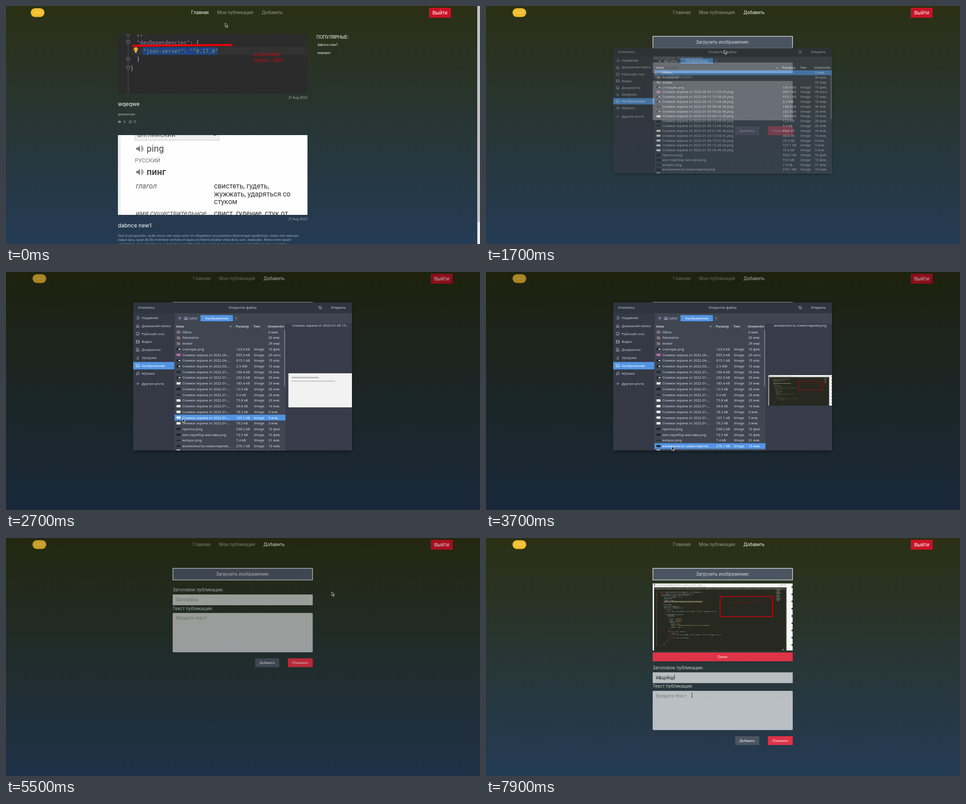
Animation, 1055 px wide and 531 px high, one loop 8 s. Source, as an HTML page:

```html
<!DOCTYPE html>
<html lang="ru">
<head>
<meta charset="utf-8">
<title>Новая публикация</title>
<style>
  html, body { margin: 0; width: 100%; height: 100%; overflow: hidden; background: #273638; }
  #stage { display: block; width: 1055px; height: 531px; }
  text { white-space: pre; }
  .ui { font-family: Inter, sans-serif; }
  .gtk { font-family: "Noto Sans", "Open Sans", sans-serif; }
  .mono { font-family: "DejaVu Sans Mono", monospace; }
  .dict { font-family: Roboto, sans-serif; }
  .mark { font-family: "Liberation Sans", sans-serif; }
</style>
</head>
<body>
<svg id="stage" viewBox="0 0 1055 531"></svg>
<script>
const LOOP = 8000, TICK = 100;
const BLUE = '#5294e2', RED = '#df3347', SLATE = '#4b5562';
const stage = document.getElementById('stage');

const text = (x, y, s, size, fill, more = '') =>
  `<text x="${x}" y="${y}" font-size="${size}" fill="${fill}" ${more}>${s}</text>`;
const rect = (x, y, w, h, fill, more = '') =>
  `<rect x="${x}" y="${y}" width="${w}" height="${h}" fill="${fill}" ${more}/>`;
const line = (d, stroke, width = 0.8, more = '') =>
  `<path d="${d}" fill="none" stroke="${stroke}" stroke-width="${width}" ${more}/>`;
const shape = (d, fill, more = '') => `<path d="${d}" fill="${fill}" ${more}/>`;
const group = (id, body, cls = '') => `<g id="${id}" class="${cls}">${body}</g>`;
const MID = 'text-anchor="middle"', END = 'text-anchor="end"', BOLD = 'font-weight="600"';

function nav() {
  const link = (id, x, s) => text(x, 18.4, s, 9.89, '#9a9c8f', `id="${id}"`);
  return rect(59, 5, 30.6, 19.5, '#f3bd2b', 'rx="9.7"') +
    text(74.3, 17.4, 'LOGO', 7, '#f9dd8c', MID) +
    link('home', 416, 'Главная') + link('mine', 474, 'Мои публикация') + link('add', 573, 'Добавить') +
    rect(945.5, 4, 48.5, 22, '#cb1226') + text(969.7, 18.6, 'Выйти', 10.99, '#fff', MID);
}

function editorShot() {
  const fold = y => `<path d="M268.5 ${y - 4}h7v5.5l-3.5 3l-3.5 -3zM270.5 ${y}h3" fill="#2b2b2b" stroke="#8a8a8a" stroke-width=".9"/>`;
  const code = (x, y, s, fill) => text(x, y, s, 11.55, fill);
  return '<svg x="249" y="63" width="422" height="132" viewBox="249 63 422 132">' +
    rect(249, 63, 422, 132, '#2b2b2b') + rect(280, 91, 391, 18, '#323232') +
    rect(304, 92, 168, 17, '#214283') + line('M272 63V195', '#606060') +
    fold(63) + fold(81) + fold(119) + fold(138) +
    '<g class="mono">' + code(291, 66, '},', '#a9b7c6') +
    code(291, 85.5, '<tspan fill="#9a7bab">"devDependencies"</tspan>: {', '#a9b7c6') +
    code(305, 104.5, '"json-server": "^0.17.0"', '#7d9b6c') +
    code(291, 123, '}', '#a9b7c6') + code(277, 142.5, '}', '#a9b7c6') + '</g>' +
    '<circle cx="289" cy="96.5" r="4.6" fill="#f0a732"/>' + rect(287, 101, 4, 3, '#c9c9c9') +
    line('M281 89Q390 87.5 504 87', '#e20008', 4.4) +
    `<g class="mark">${text(550, 112, 'установил', 12.8, '#c30c14')}${text(550, 125, 'через --dev', 12.8, '#c30c14')}</g></svg>`;
}

function dictionaryShot() {
  const speaker = y => shape(`M290 ${y - 2.5}h3.5l4.5 -4.5v14l-4.5 -4.5h-3.5z`, '#777') +
    line(`M300.5 ${y - 3.5}q3 3.5 0 7M301.5 ${y - 7}q7 7 0 14`, '#777', 1.5);
  const word = (x, y, s, more) => text(x, y, s, 15.6, '#333', more);
  const italic = 'font-style="italic" fill-opacity=".8"';
  return '<svg x="249" y="288" width="422" height="178" viewBox="249 288 422 178" class="dict">' +
    rect(249, 288, 422, 178, '#fefefe') + rect(249, 288, 2, 178, '#dfe3e4') + line('M253.5 288V466', '#c5cacb', 1) +
    rect(287, 280, 187, 19.5, '#efefef', 'stroke="#c4c4c4"') +
    text(292, 291.5, 'английский', 15.6, '#555') + shape('M461 287h7l-3.5 3.5z', '#666') +
    speaker(318.5) + text(313, 325, 'ping', 20, '#444') +
    text(287, 349, 'РУССКИЙ', 12.2, '#777') +
    speaker(370.5) + text(313, 377, 'пинг', 20, '#333', 'font-weight="500"') +
    word(289, 406.5, 'глагол', italic) + word(463, 407, 'свистеть, гудеть,') +
    word(463, 424.5, 'жужжать, ударяться со') + word(463, 442, 'стуком') +
    word(289, 467.5, 'имя существительное', italic) + word(463, 467.5, 'свист, гудение, стук от') + '</svg>';
}

function feedPage() {
  const grey = '#b4b8b4';
  return editorShot() + text(671, 207.3, '21 Aug 2022', 7.15, grey, END) +
    text(249, 222.6, 'wqeqwe', 12.1, '#fff') + text(249, 243.6, 'qweqweqw', 7.15, grey) +
    shape('M249.3 258.4q3.3 -4.8 6.6 0q-3.3 4.8 -6.6 0z', grey) +
    '<circle cx="252.6" cy="258.4" r="1.1" fill="#2a3735"/>' + text(261, 261, '3', 7.15, grey) +
    line('M274 261v-2.6a2.8 2.7 0 1 1 2.8 2.6zM275.4 258.4h2.8', grey, 0.7) + text(284.8, 261, '0', 7.15, grey) +
    dictionaryShot() + text(671, 478.1, '21 Aug 2022', 7.15, grey, END) +
    text(249, 493.6, 'dabnce new1', 12.1, '#fff') +
    ['Sed ut perspiciatis, unde omnis iste natus error sit voluptatem accusantium doloremque laudantium, totam rem aperiam',
     'eaque ipsa, quae ab illo inventore veritatis et quasi architecto beatae vitae dicta sunt, explicabo. Nemo enim ipsam',
     'voluptatem, quia voluptas sit, aspernatur aut odit aut fugit, sed quia consequuntur magni dolores eos, qui ratione']
      .map((s, i) => text(249, 514.5 + i * 9.6, s, 7.15, '#a8b0b5')).join('') +
    text(691, 73.3, 'ПОПУЛЯРНЫЕ:', 9.7, '#fff') +
    text(693.3, 89.2, 'dabnce new1', 7.2, '#fff') + text(693.3, 106.5, 'wqeqwe', 7.2, '#fff') +
    rect(1049, 0, 6, 531, '#e9ebeb') + rect(1049.6, 0, 5.4, 482, '#bdc0c0');
}

// Code listing: leading digit is the indent level.
const LISTING = `0async commentsByPostId(req: Request, res: Response) {
1const post_id: any = req.params.post_id;
1CommentModel.find({ post: post_id })
2.sort({ createdAt: -1 })
2.populate({
3path: "user",
3select: "fullname avatarUrl profile_bi nickname",
2})
2.limit(100)
2.populate("comments")
2.exec((err, comments) => {
3if (err) {
4return res.status(500).json({ status: "error", message: err });
3}
4CommentModel.populate(
5comments,
5{
6path: "children",
6model: "Comment",
6populate: {
7path: "user",
7select: "fullname avatarUrl profile_bi nickname",
7model: "user",
6},
5},
5function (err, items) {
6if (err) {
7return res.status(500).json({ status: "error", message: err });
6}
7return res.json(items);
5}
4);
3}
2});
0}`.split('\n');

const tint = s => s.replace(/("[^"]*")|\b(async|function|const|return|if)\b|(\w+)(?=\()/g, (m, str, key) =>
  `<tspan fill="${str ? '#e6db74' : key ? '#f0568c' : '#7fd3e0'}">${m}</tspan>`);

// Drawn in a 312 x 150 box.
function codeShot() {
  let s = rect(0, 0, 312, 150, '#f8f8f6') + rect(3, 9, 295, 141, '#27281f') + rect(3, 9, 295, 5, '#45463f');
  s += rect(3, 2.2, 2.6, 2.6, '#444') + text(7, 4.8, 'src/controllers/CommentController.ts (server, client) - editor', 2.8, '#444') +
    text(4, 8.3, 'File  Edit  Selection  Find  View  Goto  Tools  Project  Preferences  Help', 2.6, '#555') +
    line('M281 3.5h3M287 2.5h2v2h-2zM293.5 2l2.5 2.5m0 -2.5l-2.5 2.5', '#555', 0.5);
  for (let i = 0; i < 13; i++) s += text(7 + i * 22, 12.8, 'module' + i + '.ts ×', 2.5, '#a5a69e');
  s += rect(25, 39.2, 85, 3.5, '#57564a');
  LISTING.forEach((row, i) => {
    const y = 21 + i * 3.53;
    s += text(10, y, 20 + i, 2.6, '#85867c', END) +
      text(16 + row[0] * 3.58, y, tint(row.slice(1)), 2.97, '#d5d5c8');
  });
  for (let i = 0; i < 19; i++) s += rect(274 + i * 3 % 5, 12.5 + i * 1.5, 3 + i * 7 % 9, 0.7, '#85867a');
  for (let i = 0; i < 9; i++) s += `<ellipse cx="312" cy="${8 + i * 16.2}" rx="2.8" ry="2" fill="#222"/>`;
  s += rect(296, 14, 2, 136, '#4a4b44') + rect(289, 147, 3, 2, '#aaa') +
    rect(150, 29.2, 117, 45, 'none', 'stroke="#c3060c" stroke-width="1.8"') +
    text(166, 44, 'здесь вложенность коментариев в посте', 3.4, '#a80b10');
  return `<g class="mono">${s}</g>`;
}

function formPage() {
  const label = '#c8cbc8', hint = '#7c827f', glass = 'fill-opacity=".68"';
  const fields = text(371, 119.2, 'Заголовок публикации:', 9.89, label) +
    rect(371, 126, 311.7, 24, '#fff', glass) +
    text(378, 141.4, 'Заголовок', 9.89, hint, 'id="hint"') + text(378, 141.4, '', 9.89, '#15191a', 'id="typed"') +
    rect(378, 131.2, 0.8, 11.6, '#111', 'id="caret"') +
    text(371, 160.8, 'Текст публикации:', 9.89, label) +
    rect(371, 167.3, 311.7, 87.6, '#fff', glass + ' rx="2.5"') +
    text(378, 182.4, 'Введите текст', 9.89, hint) +
    rect(554.5, 268.5, 53.5, 19.6, SLATE) + text(581.2, 281, 'Добавить', 7.25, '#fff', MID) +
    rect(627.5, 268.5, 55.2, 19.6, RED) + text(655, 281, 'Отменить', 7.25, '#fff', MID);
  const upload = `<svg x="371" y="101.3" width="311.7" height="149.7" viewBox="0 0 312 150" preserveAspectRatio="none">${codeShot()}</svg>` +
    rect(371, 255.3, 311.7, 19.7, RED) + text(526.6, 267.7, 'Delete', 7.15, '#fff', MID);
  return rect(371.5, 67.6, 310.8, 26, SLATE, 'stroke="#e6e9ea" stroke-width="1.3"') +
    text(526.7, 83.6, 'Загрузить изображение:', 9.89, '#d9dcde', MID) +
    group('upload', upload) + group('fields', fields);
}

// name | size | date | thumbnail colour
const shot = s => 'Снимок экрана от 2022-' + s;
const FILES = ['Обои||6 мая.|', 'flameshot||30 янв.|', 'avatar||29 мар.|',
  'счетщик.png|133.4 kB|10 фев.|half', shot('06-29 11-53-43.png|995.5 kB|29 июн.|#c467b5'),
  shot('04-15 10-58-33.png|915.1 kB|15 апр.|half'), shot('03-10 11-24-28.png|2.9 MB|10 мар.|half'),
  shot('01-30 00-48-36.png|148.4 kB|30 янв.|#282c30'), shot('01-30 00-02-46.png|232.9 kB|30 янв.|half'),
  shot('01-29 00-12-26.png|185.4 kB|29 янв.|#e4e4e4'), shot('01-26 12-04-47.png|12.9 kB|26 янв.|#1e2228'),
  shot('01-26 12-04-13.png|5.4 kB|26 янв.|thin'), shot('01-20 01-00-30.png|75.8 kB|20 янв.|#f2f2f2'),
  shot('01-14 13-53-01.png|38.8 kB|14 янв.|#f2f2f2'), shot('01-06 15-01-42.png|78.3 kB|6 янв.|#f2f2f2'),
  shot('01-05 15-20-20.png|107.1 kB|5 янв.|#f2f2f2'), shot('01-03 00-49-35.png|76.3 kB|3 янв.|#f2f2f2'),
  'пропсы.png|338.2 kB|10 фев.|#23272b', 'мэп перебор массива.png|73.5 kB|10 фев.|#1f2328',
  'вопрос.png|7.4 kB|31 янв.|thin', 'вложенность коментариев.png|276.1 kB|19 мая.|#25282b'
].map(s => s.split('|'));
const short = (s, n) => s.length > n ? s.slice(0, n).replace(/\.p?$/, '') + '…' : s;

function thumb(y, kind) {
  if (!kind) return shape(`M380 ${y - 3.2}h3.5l1 1h3.7v5.4h-8.2z`, '#857672') + rect(380, y - 3.4, 4, 1, '#b4534f');
  if (kind === 'thin') return rect(379.5, y - 1.2, 9, 2.4, '#20242a');
  if (kind === 'half') return rect(379.5, y - 2.5, 9, 5, '#1f2327') + rect(384, y - 1.2, 4, 2.6, '#dedede');
  return rect(379.5, y - 2.6, 9, 5.2, kind);
}

function fileList(id, sel, narrow) {
  const dx = narrow ? -148 : 0, right = narrow ? 622 : 770, ink = '#d3dae3', head = '#c3c9d3';
  const title = (x, s) => text(x, 124, s, 7.6, head, BOLD);
  let s = rect(375, 115, right - 375, 283, '#404552') +
    title(378.5, 'Имя') + shape(`M${645.5 + dx} 122.3h5l-2.5 -2.6z`, head) +
    title(659.5 + dx, 'Размер') + title(699 + dx, 'Тип') + title(731 + dx, 'Изменён') +
    line(`M${655.7 + dx} 117v10M${695.5 + dx} 117v10M${727.5 + dx} 117v10`, '#575c69', 0.7);
  FILES.forEach(([name, size, date, kind], i) => {
    const y = 134 + i * 12.72, col = i === sel ? '#fff' : ink;
    const cell = (x, v) => text(x, y + 2.7, v, 7.63, col);
    if (i === sel) s += rect(375, y - 6.4, right - 375, 12.8, BLUE);
    s += thumb(y, kind) + cell(392.8, narrow ? short(name, 25) : name) +
      cell(660.3 + dx, size) + cell(700 + dx, size && 'Image') + cell(732 + dx, date);
  });
  s += rect(379.5, 396.2, 8, 2, '#eee') + line(`M392 397.4H${right}`, '#9aa0ab', 0.7, 'stroke-dasharray="3 2"') +
    rect(right - 2.8, 129, 2, 127, '#777d8a', 'rx="1"');
  if (narrow) {
    s += rect(622, 115, 148, 283, '#383c4a') +
      text(699.5, 122.3, short(FILES[sel][0], 30), 7.63, '#d3dae3', MID);
    s += sel === 20
      ? `<svg x="628.5" y="230" width="141.5" height="68" viewBox="0 0 312 150" preserveAspectRatio="none">${codeShot()}</svg>`
      : rect(628.5, 226, 141.5, 76, '#f2f2f2') + rect(636, 234, 60, 3, '#b9b9b9') + rect(636, 242, 96, 3, '#d0d0d0');
  }
  return `<svg id="${id}" x="375" y="115" width="395" height="283" viewBox="375 115 395 283">${s}</svg>`;
}

function dialog() {
  const ink = '#c9cfd8', frame = '#2f343f';
  const places = [
    ['Недавние', 'M-3 0a3.2 3.2 0 1 0 1 -2.5M0 -2v2.2l1.6 1'],
    ['Домашняя папка', 'M-4 .3l4 -3.8l4 3.8M-2.7 -.6v4h2v-2.4h1.4v2.4h2v-4'],
    ['Рабочий стол', 'M-3.5 -3h7v4.6h-7zM-2 3.4h4'],
    ['Видео', 'M-3.5 -3h7v6h-7zM-1.8 -3v6M1.8 -3v6'],
    ['Документы', 'M-3 -3.5h4l2 2v5h-6zM-1.5 0h3M-1.5 1.8h3'],
    ['Загрузки', 'M0 -3.5v4.5M-2 -1l2 2l2 -2M-3.2 3h6.4'],
    ['Изображения', 'M-3.5 -3h7v6h-7zM-3.3 2.5l2.5 -3l1.8 2l1 -1l1.3 2'],
    ['Музыка', 'M-1.5 2.2v-5l4.3 -.7v5M-1.5 2.2a1 1 0 1 1 -.3 -.6M2.8 1.5a1 1 0 1 1 -.3 -.6'],
    ['Другие места', 'M-3 0h6M0 -3v6']];
  let s = rect(285, 72, 483, 328, '#000', 'opacity=".45" filter="url(#soft)"') +
    rect(283, 68, 487, 330, '#383c4a', 'rx="2"') + rect(283, 68, 487, 24, frame, 'rx="2"') +
    text(294, 82.4, 'Отменить', 7.63, ink) + text(526.6, 82.4, 'Открытие файла', 7.63, ink, MID) +
    '<circle cx="699" cy="79" r="2.7" fill="none" stroke="#c9cfd8" stroke-width=".9"/>' + line('M701 81l2.3 2.4', ink, 1) +
    rect(713.7, 72.7, 52, 14.4, BLUE, 'id="openHot" rx="1.2"') + text(739.5, 82.4, 'Открыть', 7.63, '#dde2e9', MID) +
    rect(283, 92, 92, 306, '#353945') + rect(375, 92, 395, 23, '#404552') + rect(283, 200.7, 91.6, 16.6, BLUE);
  places.forEach(([name, d], i) => {
    const y = 102.6 + i * 17.7 + (i === 8 ? 5 : 0), col = i === 6 ? '#fff' : ink;
    s += `<g transform="translate(293.2 ${y})">${line(d, col, 0.75)}</g>` + text(302, y + 2.7, name, 7.63, col);
  });
  s += rect(378.5, 96, 141, 14, '#444a58', 'rx="1.5" stroke="#353a46" stroke-width=".7"') +
    rect(433, 96, 72, 14, BLUE) + shape('M387.8 100.4v5.2l-3.2 -2.6z', ink) + shape('M511 100.6v4.8l2.9 -2.4z', '#8b919c') +
    `<g transform="translate(400.5 103)">${line(places[1][1], ink, 0.9)}</g>` +
    text(406.8, 105.7, 'rulmi', 7.63, ink) + text(469, 105.7, 'Изображения', 7.63, '#fff', MID) +
    fileList('listWide', 0, false) + fileList('listFirst', 15, true) + fileList('listLast', 20, true);
  return s;
}

stage.innerHTML = `<defs>
  <linearGradient id="sky" x2="0" y2="1"><stop stop-color="#2b3014"/><stop offset="1" stop-color="#243b55"/></linearGradient>
  <filter id="soft"><feGaussianBlur stdDeviation="4"/></filter></defs>` +
  rect(0, 0, 1055, 531, 'url(#sky)') +
  group('nav', nav(), 'ui') + group('feed', feedPage(), 'ui') + group('form', formPage(), 'ui') +
  group('status', shape('M0 519H73.5q2 0 2 2V531H0z', '#c2c5c8') + text(-2, 527.8, 'localhost:3000/new', 8, '#33383c'), 'gtk') +
  rect(0, 0, 1055, 531, '#000', 'id="dim"') + group('dialog', dialog(), 'gtk') +
  group('arrow', shape('M0 0V8.8L2 7L3.6 10.4L5.1 9.7L3.6 6.4L6.4 6.2z', '#17191b', 'stroke="#fff" stroke-width=".8"')) +
  group('beam', line('M-1.4 -4.4h2.8M0 -4.4v8.8M-1.4 4.4h2.8', '#15191a', 0.8));

const el = {};
stage.querySelectorAll('[id]').forEach(n => el[n.id] = n);

// Pointer: time in ticks, x, y; each position holds until the next.
const PATH = `0 488 38,2 500 30,3 512 20,5 545 17,6 571 17,7 578.5 16,10 570 30,11 550 50,12 533 68,13 528 80,
16 528 83,17 530 98,18 532.5 113,19 533 130,20 531 148,21 528 165,22 524 180,23 520 190,24 455 270,25 393 327,
34 398 340,35 407 368,36 413.5 389,39 413 388,41 440 370,42 530 300,43 640 190,44 730 105,45 765 74,46 748 81,47 738 86,
54 736 92,55 725 120,56 700 165,57 671 211,59 640 222,60 570 245,61 510 266,62 482 276,63 476 286,64 545 292,65 669 265,
67 570 290,68 475.5 310,78 470 326,79 458.5 351`.split(',').map(p => p.trim().split(' ').map(Number));
const KEYS = [7100, 7200, 7300, 7300, 7500, 7700, 7800];
const WORD = 'йфцуйцу';

const clamp = v => Math.max(0, Math.min(1, v));
const show = (node, on) => node.style.display = on ? '' : 'none';
const move = (node, x, y) => node.setAttribute('transform', `translate(${x} ${y})`);

function draw(t) {
  const onFeed = t < 800;
  show(el.feed, onFeed);
  show(el.form, !onFeed);
  move(el.nav, onFeed ? -4 : 0, 0);
  el.home.setAttribute('fill', onFeed ? '#fff' : '#9a9c8f');
  el.add.setAttribute('fill', t >= 600 ? '#fff' : '#9a9c8f');
  show(el.status, t >= 600 && t < 1100);

  const loaded = t >= 5600;
  show(el.upload, loaded);
  move(el.fields, 0, loaded ? 173.7 : 0);
  const count = KEYS.filter(k => k <= t).length;
  el.typed.textContent = WORD.slice(0, count);
  show(el.hint, !count);
  show(el.caret, t >= 6800);
  el.caret.setAttribute('x', 378 + (count ? el.typed.getComputedTextLength() : 0));

  el.dim.setAttribute('opacity', 0.3 * Math.min(clamp((t - 1680) / 620), clamp((5700 - t) / 350)));
  show(el.dialog, t >= 1700 && t < 5500);
  const rest = 0.18 ** ((t - 1700) / 100), closing = t >= 5400;
  const scale = closing ? 0.93 : 1 - 0.15 * rest;
  el.dialog.setAttribute('opacity', closing ? 0.4 : clamp(1 - 0.35 * rest));
  el.dialog.setAttribute('transform', `translate(0 ${233 * (1 - scale)}) scale(1 ${scale})`);
  show(el.listWide, t < 2700);
  show(el.listFirst, t >= 2700 && t < 3600);
  show(el.listLast, t >= 3600);
  show(el.openHot, t >= 4500);

  const [, x, y] = PATH.filter(p => p[0] * TICK <= t).pop();
  const beam = t >= 6800;
  show(el.arrow, !beam);
  show(el.beam, beam && (t < 7100 || t >= 7800));
  move(beam ? el.beam : el.arrow, x, y);
}

const start = performance.now();
function frame() {
  const t = (performance.now() - start) % LOOP;
  draw(Math.floor(t / TICK) * TICK);
  requestAnimationFrame(frame);
}
frame();
</script>
</body>
</html>
```
